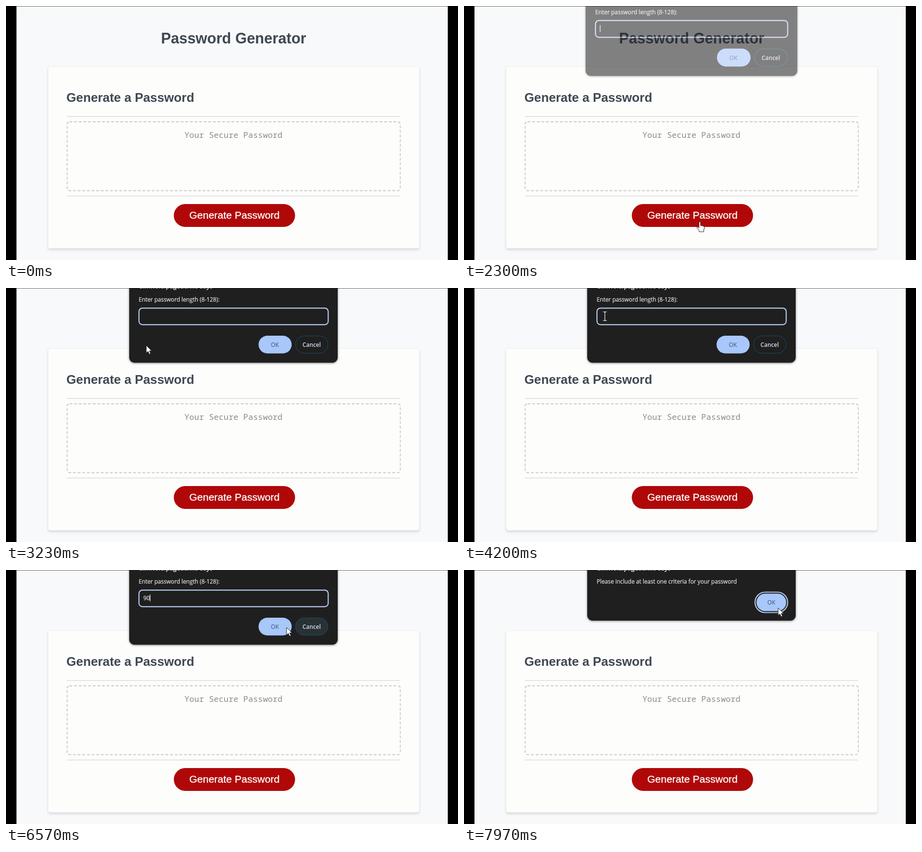
These frames come from a looping animation (928 by 522 pixels, 8000 ms). An HTML page:

```html
<!DOCTYPE html>
<html lang="en">
<head>
<meta charset="utf-8">
<title>Password Generator</title>
<style>
  html, body { margin: 0; width: 100%; height: 100%; overflow: hidden; background: #000; }
  svg { display: block; width: 100%; height: 100%; }
  text { font-family: "Liberation Sans", Arial, sans-serif; }
  .heading { font-weight: 700; fill: #3f4852; }
  .mid { text-anchor: middle; }
  .mono { font: 16.8px "Noto Sans Mono", monospace; fill: #8c8c8c; }
  .button { font-size: 21px; fill: #fff; stroke: #fff; stroke-width: .35; }
  .card { fill: #fdfdfc; stroke: #eeeeeb; filter: drop-shadow(0 3px 2px rgba(150, 150, 150, .3)); }
  .rule { stroke: #e4e4e8; stroke-width: 2; }
  .field { fill: none; stroke: #cacace; stroke-width: 1.9; stroke-dasharray: 5.7 3.8; }
  .panel { fill: #1f1f1f; filter: drop-shadow(0 1px 2px rgba(40, 40, 40, .6)); }
  .ring { fill: #1f1f1f; stroke: #b4caf0; stroke-width: 2.2; }
  .pill { fill: #a8c7fa; }
  .dialog text { font: 11.7px "Open Sans", "Noto Sans", sans-serif; fill: #e8e8e8; stroke: #e8e8e8; stroke-width: .2; }
  .dialog .site { font-size: 12.5px; font-weight: 600; }
  .dialog .ok { fill: #38507c; stroke: none; }
  .dialog .cancel { font-weight: 600; fill: #d0dff5; stroke: none; }
  .cursor path { fill: #fff; stroke: #222; stroke-linejoin: round; }
  .cursor #beam { fill: none; stroke: #e6e6e6; stroke-width: 1.3; }
</style>
</head>
<body>
<svg viewBox="0 0 928 522" preserveAspectRatio="none">
  <rect width="928" height="522"/>
  <rect x="21.5" width="885.5" height="522" fill="#f8f9fb"/>
  <rect x="21.5" width="885.5" height="1" fill="#6a6a68"/>
  <text class="heading mid" x="467.3" y="77" font-size="30.5">Password Generator</text>

  <rect class="card" x="86.5" y="124.5" width="762" height="373.5" rx="4"/>
  <text class="heading" x="124" y="197" font-size="25.8">Generate a Password</text>
  <path class="rule" d="M125 227H809M125 390.5H809"/>
  <rect class="field" x="125.5" y="238" width="684" height="141.5" rx="5"/>
  <text class="mono mid" x="467" y="270.5">Your Secure Password</text>
  <rect x="344.5" y="407" width="249" height="47" rx="23.5" fill="#b00808"/>
  <text class="button mid" x="469" y="437">Generate Password</text>

  <g class="dialog" id="prompt">
    <rect class="panel" x="253" y="-40" width="428" height="193.5" rx="11"/>
    <text class="site" x="273" y="1">elmwold.pageden.io says</text>
    <text x="272.5" y="28.3">Enter password length (8-128):</text>
    <rect class="ring" x="273" y="41.3" width="388.5" height="34" rx="7"/>
    <text id="entry" x="282" y="62"></text>
    <rect id="caret" y="50.5" width="1.3" height="14" fill="#eee"/>
    <rect class="pill" x="518.5" y="98" width="68" height="36.5" rx="18.2"/>
    <text class="ok mid" x="552" y="120.8">OK</text>
    <rect id="cancel" x="594.5" y="98.5" width="66.5" height="35.5" rx="17.7" stroke="#155070"/>
    <text class="cancel mid" x="627.5" y="120.8">Cancel</text>
  </g>

  <g class="dialog" id="alert">
    <rect class="panel" x="253" y="-40" width="428" height="144" rx="11"/>
    <text class="site" x="273" y="1">elmwold.pageden.io says</text>
    <text x="272.5" y="28.3">Please include at least one criteria for your password</text>
    <rect class="ring" x="597.5" y="45.5" width="67" height="42" rx="21"/>
    <rect class="pill" x="600.5" y="48.5" width="61" height="36" rx="18"/>
    <text class="ok mid" x="631" y="71.2">OK</text>
  </g>

  <g class="cursor" id="cursor">
    <path id="arrow" d="M0 0V15.5L3.6 12.2 6.2 18 8.8 16.8 6.3 11.2H11Z"/>
    <path id="hand" d="M-1.7 1.5Q0 -1.2 1.7 1.5V8L4.5 8.5 8 9.6Q9.8 10.4 9.5 13L8.2 18V21H-1V18.6L-5.8 12.6Q-6 10 -3.8 11L-1.7 13Z"/>
    <path id="beam" d="M-3.5 -9H-1.2L0 -8 1.2 -9H3.5M-3.5 9H-1.2L0 8 1.2 9H3.5M0 -8V8"/>
  </g>
</svg>
<script>
const LOOP = 8000;
const PROMPT_OPEN = 2230, ALERT_OPEN = 6990, PROMPT_CLOSE = 7000;
const $ = id => document.getElementById(id);

const progress = (t, from, to) => Math.min(1, Math.max(0, (t - from) / (to - from)));
const smooth = p => p * p * (3 - 2 * p);
const within = (v, low, high) => v >= low && v <= high;

// Each move starts where the one before it ended.
const ENTRANCE = { x: 845, y: 515 };
const MOVES = [
  { from: 830, to: 1130, x: 735, y: 205 },
  { from: 1130, to: 1600, x: 484, y: 443 },
  { from: 2770, to: 3230, x: 288, y: 118 },
  { from: 3230, to: 3570, x: 295, y: 58 },
  { from: 5070, to: 5130, x: 307, y: 53 },
  { from: 5900, to: 5970, x: 633, y: 69 },
  { from: 6130, to: 6350, x: 645, y: 122 },
  { from: 6350, to: 6570, x: 576, y: 118 },
  { from: 7260, to: 7970, x: 645, y: 78 }
];

function cursorAt(t) {
  const pos = { ...ENTRANCE };
  for (const move of MOVES) {
    const p = smooth(progress(t, move.from, move.to));
    pos.x += (move.x - pos.x) * p;
    pos.y += (move.y - pos.y) * p;
  }
  // idle sway over the input
  pos.x += 10 * Math.sin(progress(t, 3600, 4930) * 4 * Math.PI);
  return pos;
}

function cursorKind(t, { x, y }) {
  if (t < MOVES[0].from) return '';
  const prompting = within(t, PROMPT_OPEN + 170, PROMPT_CLOSE);
  if (prompting) return within(x, 273, 661) && within(y, 41, 76) ? 'beam' : 'arrow';
  const overGenerate = within(x, 345, 593) && within(y, 407, 454);
  return overGenerate || within(t, PROMPT_CLOSE, PROMPT_CLOSE + 250) ? 'hand' : 'arrow';
}

function place(dialog, lift, opacity) {
  const s = 1 + .015 * lift;
  dialog.setAttribute('transform', `translate(${467 * (1 - s)} ${-11.5 * lift}) scale(${s})`);
  dialog.setAttribute('opacity', opacity);
}

function open(dialog, t) {
  const rest = 1 - progress(t, 0, 260);
  place(dialog, 2 * rest ** 2, 1 - rest ** 2.5);
}

function close(dialog, t) {
  const p = progress(t, 0, 200);
  place(dialog, 1.9 * p, (1 - p) ** 1.4);
}

function render(t) {
  if (t < PROMPT_CLOSE) open($('prompt'), t - PROMPT_OPEN);
  else close($('prompt'), t - PROMPT_CLOSE);
  open($('alert'), t - ALERT_OPEN);

  const entry = '90'.slice(0, Math.max(0, Math.floor((t - 4830) / 270)));
  $('entry').textContent = entry;
  $('caret').setAttribute('x', 281.8 + entry.length * 6.7);
  $('caret').setAttribute('opacity', (t + 730) % 1000 < 500 ? 1 : 0);
  $('cancel').setAttribute('fill', within(t, 6200, 6620) ? '#2a3134' : 'none');

  const pos = cursorAt(t), kind = cursorKind(t, pos);
  for (const id of ['arrow', 'hand', 'beam']) $(id).style.display = id === kind ? '' : 'none';
  $('cursor').setAttribute('transform', `translate(${pos.x} ${pos.y})`);
}

const start = performance.now();
function tick() {
  render((performance.now() - start) % LOOP);
  requestAnimationFrame(tick);
}
tick();
</script>
</body>
</html>
```
